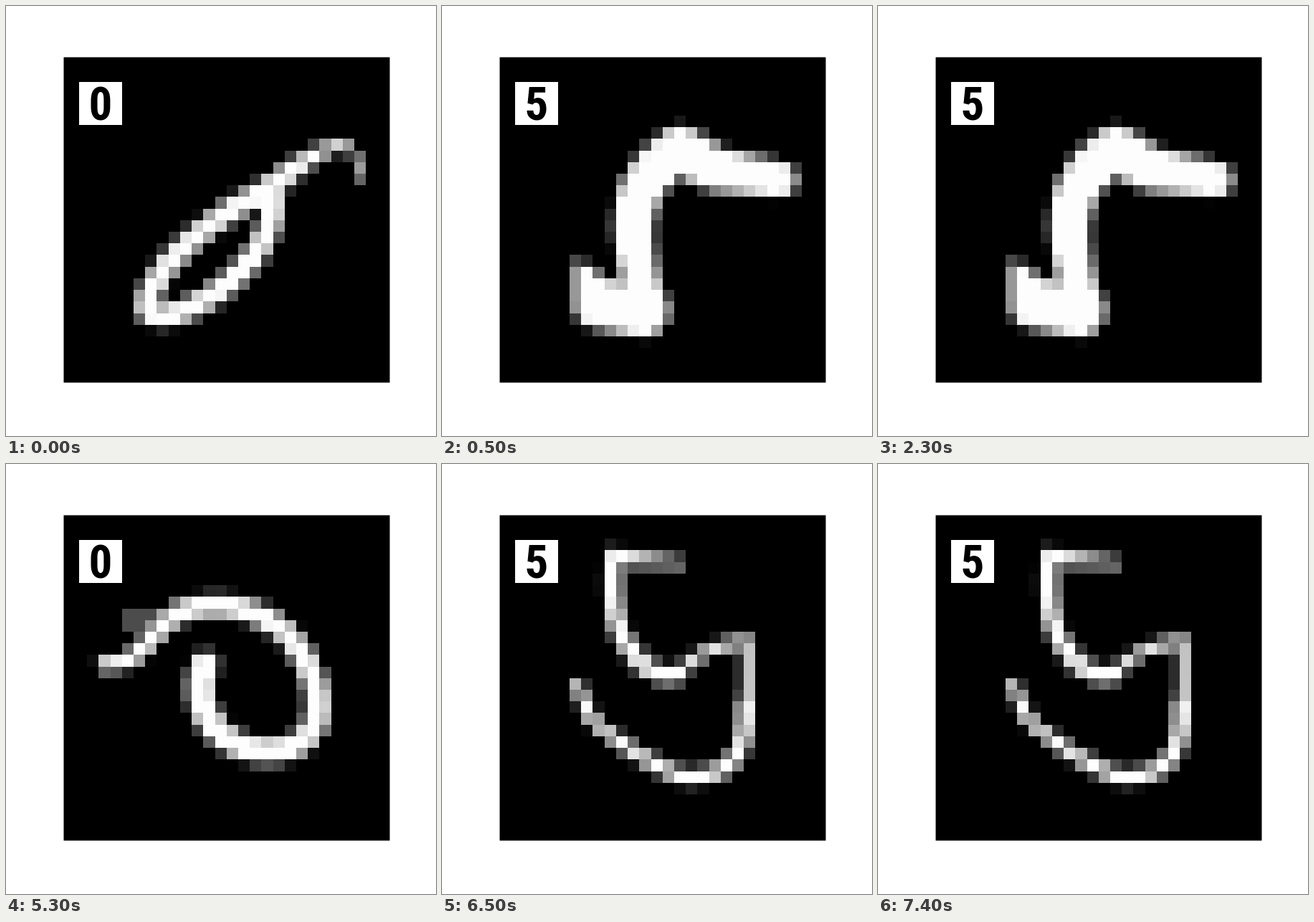
An HTML page for the animation above (8 s loop, 600 by 600 pixels).

```html
<!DOCTYPE html>
<html lang="en">
<head>
<meta charset="utf-8">
<title>Handwritten digits</title>
<style>
  html, body { margin: 0; width: 100%; height: 100%; overflow: hidden; background: #fff; }
  svg { display: block; width: 100vw; height: 100vh; }
  text {
    font-family: "Roboto Condensed", "Liberation Sans Narrow", Roboto, "Liberation Sans", sans-serif;
    font-size: 65px;
    font-weight: 900;
    font-stretch: 75%;
    text-anchor: middle;
  }
</style>
</head>
<body>
<svg viewBox="0 0 600 600">
  <rect x="80.5" y="71.5" width="455" height="454"/>
  <g id="grid" shape-rendering="crispEdges"></g>
  <rect x="102" y="106" width="60" height="60" fill="#fff"/>
  <text id="label" x="132" y="159"></text>
</svg>
<script>
const SIZE = 28, CELL = 454 / SIZE, LEFT = 80.75, TOP = 71.85, LOOP = 8000;
const NS = "http://www.w3.org/2000/svg";

const make = name => document.createElementNS(NS, name);
const clamp = v => Math.max(0, Math.min(1, v));

// A pen stroke along a path in cell units, its width running from w0 to w1.
function stroke(d, w0, w1 = w0) {
  const path = make("path");
  path.setAttribute("d", d);
  const length = path.getTotalLength(), steps = Math.ceil(length * 6);
  return Array.from({ length: steps + 1 }, (_, i) => {
    const k = i / steps, { x, y } = path.getPointAtLength(k * length);
    return { x, y, r: (w0 + (w1 - w0) * k) / 2 };
  });
}

const scenes = [
  { from: 0, label: "0", strokes: [
    stroke("M25 9.8 Q25 7 23 7.1 Q20.5 7.8 17 11", .2, 2.2),
    stroke("M17.3 11 C14 12 10.5 15 8.3 17.5 C6.3 20.3 6 21.8 8.2 21.7 C11 21.5 18.5 16.5 17.3 11", 1.9)
  ] },
  { from: 500, label: "5", strokes: [
    stroke("M15 7.5 L18 9.1 L23.5 10", 4.2, 3.1),
    stroke("M15 7.4 C12 9.5 11.2 11 11 14 Q11 16.5 12 20", 4, 3),
    stroke("M6.4 17.6 L8 20.6", 1, 4.2),
    stroke("M8 20.7 L11.7 21.2", 4.2, 4.7)
  ] },
  { from: 3500, label: "0", strokes: [
    stroke("M3 12.3 C7 12.2 6.8 9 9.8 7.7", 1.2, 1.9),
    stroke("M9.8 7.7 C13 6.6 16.5 7.6 18.7 9.7 C20.5 11.8 21.4 14 21.3 16 C21.3 20.3 16.2 20.3 14 19 C11.2 17.2 10.8 14.5 11.6 12.4", 1.8, 2.3),
    stroke("M5 8.5 H7", .6)
  ] },
  { from: 6500, label: "5", strokes: [
    stroke("M15.2 3.6 L9.5 3.1", .6, 1.4),
    stroke("M9.3 3.1 C9 7 9.3 9.5 11.4 11.9 C12.5 13.2 14 13.4 15 13", 1.5),
    stroke("M15 13 Q17 10.7 20.6 10.4", .8, 1.1),
    stroke("M20.8 10.4 V15.5", .95),
    stroke("M20.7 15.7 C20.8 20.4 19 22 15.5 22 C13.5 21.6 9.5 19 7.4 17 L6.2 14.2", 1.5, 1)
  ] }
];

// Grey level of a cell: the strongest ink any part of the strokes leaves on it.
function shade(x, y, strokes) {
  let best = 0;
  for (const dot of strokes.flat())
    best = Math.max(best, dot.r + .5 - Math.hypot(x - dot.x, y - dot.y));
  return Math.round(clamp(best) * 253);
}

const grid = document.getElementById("grid");
const label = document.getElementById("label");
const cells = Array.from({ length: SIZE * SIZE }, (_, i) => {
  const x = i % SIZE, y = Math.floor(i / SIZE), el = make("rect");
  el.setAttribute("x", LEFT + x * CELL);
  el.setAttribute("y", TOP + y * CELL);
  el.setAttribute("width", CELL);
  el.setAttribute("height", CELL);
  grid.append(el);
  return { x, y, el };
});

for (const scene of scenes)
  scene.fills = cells.map(({ x, y }) => {
    const v = shade(x, y, scene.strokes);
    return v ? `rgb(${v},${v},${v})` : "none";
  });

let shown = null;
function draw(t) {
  const scene = scenes.filter(s => s.from <= t).pop();
  if (scene === shown) return;
  shown = scene;
  label.textContent = scene.label;
  cells.forEach(({ el }, i) => el.setAttribute("fill", scene.fills[i]));
}

const start = performance.now();
function tick() {
  draw(Math.max(0, performance.now() - start) % LOOP);
  requestAnimationFrame(tick);
}
tick();
</script>
</body>
</html>
```
